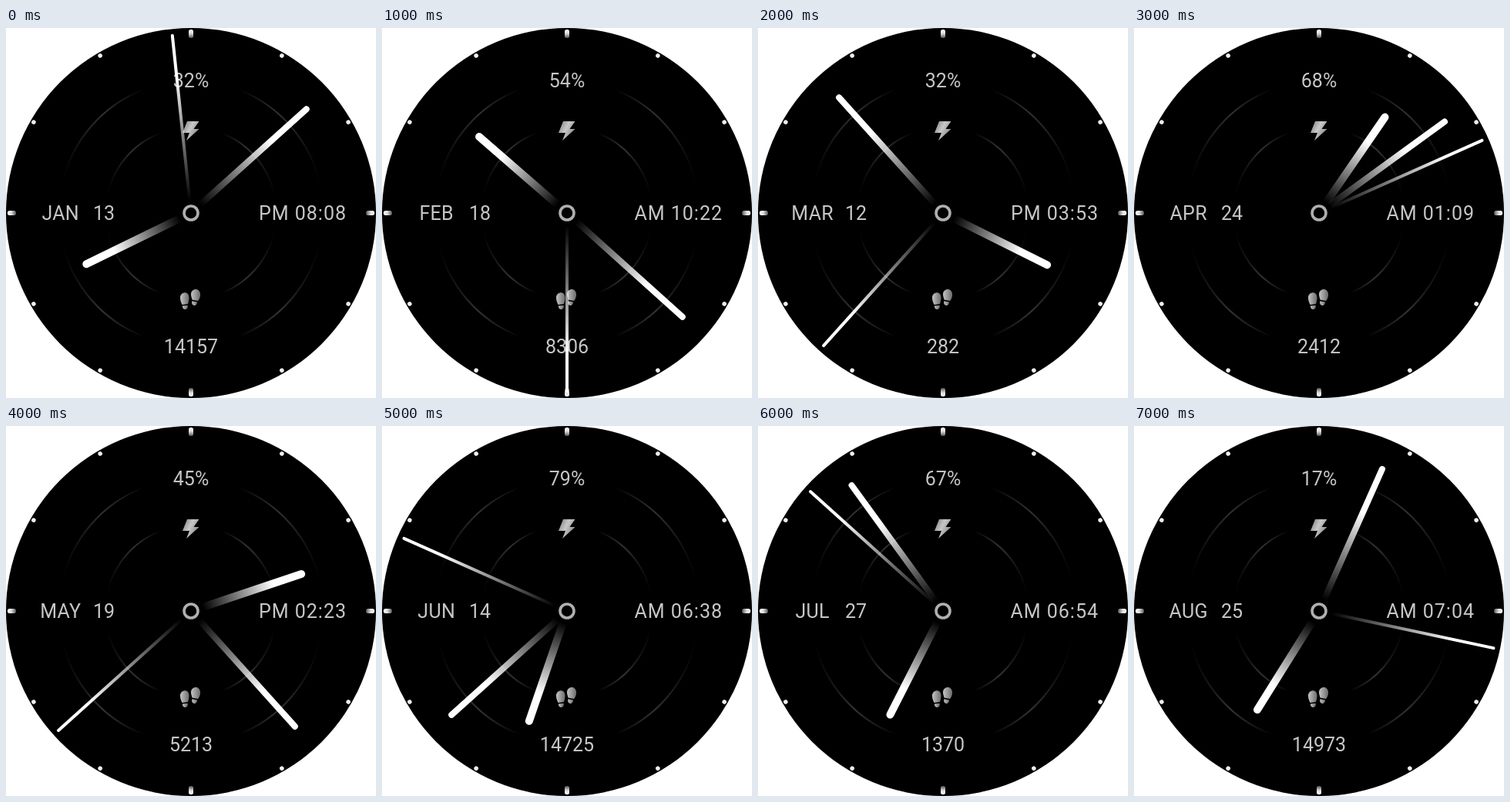
Animation, 480 px wide and 480 px high, one loop 8 s. Source, as an HTML page:

```html
<!DOCTYPE html>
<html lang="en">
<head>
<meta charset="utf-8">
<title>Watch face</title>
<style>
  html, body { margin: 0; width: 100%; height: 100%; overflow: hidden; background: #fff; }
  svg { display: block; width: 480px; height: 480px; }
  text { font: 25px Roboto, sans-serif; fill: #c6c6c6; text-anchor: middle; }
  #month { letter-spacing: .3px; }
  #time { letter-spacing: 1px; text-anchor: end; }
  .hand { stroke-linecap: round; }
</style>
</head>
<body>
<svg viewBox="0 0 480 480">
  <defs>
    <linearGradient id="fadeH" gradientUnits="userSpaceOnUse" x1="0" y1="-16" x2="0" y2="-112">
      <stop stop-color="#fff" stop-opacity="0"/><stop offset="1" stop-color="#fff"/>
    </linearGradient>
    <linearGradient id="fadeM" gradientUnits="userSpaceOnUse" x1="0" y1="-16" x2="0" y2="-140">
      <stop stop-color="#fff" stop-opacity="0"/><stop offset="1" stop-color="#fff"/>
    </linearGradient>
    <linearGradient id="fadeS" gradientUnits="userSpaceOnUse" x1="0" y1="-16" x2="0" y2="-180">
      <stop stop-color="#fff" stop-opacity="0"/><stop offset="1" stop-color="#fff"/>
    </linearGradient>
    <linearGradient id="arc">
      <stop stop-color="#333" stop-opacity="0"/>
      <stop offset=".5" stop-color="#333"/>
      <stop offset="1" stop-color="#333" stop-opacity="0"/>
    </linearGradient>
    <linearGradient id="tick" x2="0" y2="1">
      <stop stop-color="#fff"/><stop offset=".45" stop-color="#ddd"/><stop offset="1" stop-color="#555"/>
    </linearGradient>
    <linearGradient id="metal" y2=".6">
      <stop stop-color="#777"/><stop offset=".5" stop-color="#c8c8c8"/><stop offset="1" stop-color="#888"/>
    </linearGradient>
    <linearGradient id="sole">
      <stop stop-color="#c4c4c4"/><stop offset="1" stop-color="#6c6c6c"/>
    </linearGradient>
  </defs>
  <circle cx="240" cy="240" r="240"/>
  <g id="dial" transform="translate(240 240)"></g>

  <path fill="url(#metal)" d="M235 121H250.500L243.500 131H250.500L234 146L238 136H229Z"/>
  <g fill="url(#sole)">
    <path d="M231 343.500C235 342.500 238 346 237.500 351C237.300 354 236.500 356 236 358L228.500 359C227 356 226 353 226 350C226 346.500 228 344 231 343.500Z"/>
    <path d="M228.800 360.500L235.800 359.800C236 363 235 365 232.500 365C230 365 229 363 228.800 360.500Z"/>
    <path d="M247 339C250.500 339.500 252.500 343 252 347C251.700 350 250.500 352 249 354L241.500 352.500C241 350 239.800 347.500 240 345C240.300 341 243.500 338.500 247 339Z"/>
    <path d="M241.300 354.200L248.200 355.400C247.600 358.500 246 360.500 243.800 360C241.500 359.500 240.800 357 241.300 354.200Z"/>
  </g>

  <text id="battery" x="240" y="77"/>
  <text id="month" x="70.700" y="249"/>
  <text id="day" x="127" y="249"/>
  <text id="time" x="442" y="249"/>
  <text id="steps" x="240" y="422"/>

  <g transform="translate(240 240)">
    <line class="hand" id="hour" y1="-16" y2="-151" stroke-width="10" stroke="url(#fadeH)"/>
    <line class="hand" id="minute" y1="-16" y2="-201.500" stroke-width="8" stroke="url(#fadeM)"/>
    <line class="hand" id="second" y1="-16" y2="-231.500" stroke-width="4" stroke="url(#fadeS)"/>
    <circle r="9" stroke="#b0b0b0" stroke-width="3.600"/>
  </g>
</svg>
<script>
const $ = id => document.getElementById(id);

// month, day, half of day, hour, minute, second, battery, steps
const looks = [
  ['JAN', 13, 'PM', 8, 8, 59, 32, 14157],
  ['FEB', 18, 'AM', 10, 22, 30, 54, 8306],
  ['MAR', 12, 'PM', 3, 53, 37, 32, 282],
  ['APR', 24, 'AM', 1, 9, 11, 68, 2412],
  ['MAY', 19, 'PM', 2, 23, 38, 45, 5213],
  ['JUN', 14, 'AM', 6, 38, 49, 79, 14725],
  ['JUL', 27, 'AM', 6, 54, 52, 67, 1370],
  ['AUG', 25, 'AM', 7, 4, 17, 17, 14973]
];

function arc(r, from, to) {
  const at = deg => {
    const a = deg * Math.PI / 180;
    return `${r * Math.sin(a)} ${-r * Math.cos(a)}`;
  };
  const d = `M${at(from)}A${r} ${r} 0 0 1 ${at(to)}`;
  return ['1 1', '-1 1', '1 -1', '-1 -1'].map(s =>
    `<path d="${d}" transform="scale(${s})" fill="none" stroke="url(#arc)" stroke-width="2"/>`).join('');
}

function buildDial() {
  let marks = arc(171.5, 21, 77) + arc(111, 21, 79);
  for (let i = 0; i < 12; i++) {
    const shape = i % 3
      ? '<circle cy="-235.7" r="2.8" fill="#eee"/>'
      : '<rect x="-3" y="-238" width="6" height="11" rx="2.5" fill="url(#tick)"/>';
    marks += `<g transform="rotate(${i * 30})">${shape}</g>`;
  }
  $('dial').innerHTML = marks;
}

const two = n => String(n).padStart(2, '0');
const turn = (id, deg) => $(id).setAttribute('transform', `rotate(${deg})`);

function show([month, day, half, h, m, s, battery, steps]) {
  $('month').textContent = month;
  $('day').textContent = two(day);
  $('time').textContent = `${half} ${two(h)}:${two(m)}`;
  $('battery').textContent = battery + '%';
  $('steps').textContent = steps;
  turn('hour', h * 30 + m / 2);
  turn('minute', m * 6);
  turn('second', s * 6);
}

let shown = -1;
const start = performance.now();
function tick() {
  const i = Math.floor((performance.now() - start) / 1000) % looks.length;
  if (i !== shown) show(looks[shown = i]);
  requestAnimationFrame(tick);
}

buildDial();
tick();
</script>
</body>
</html>
```
